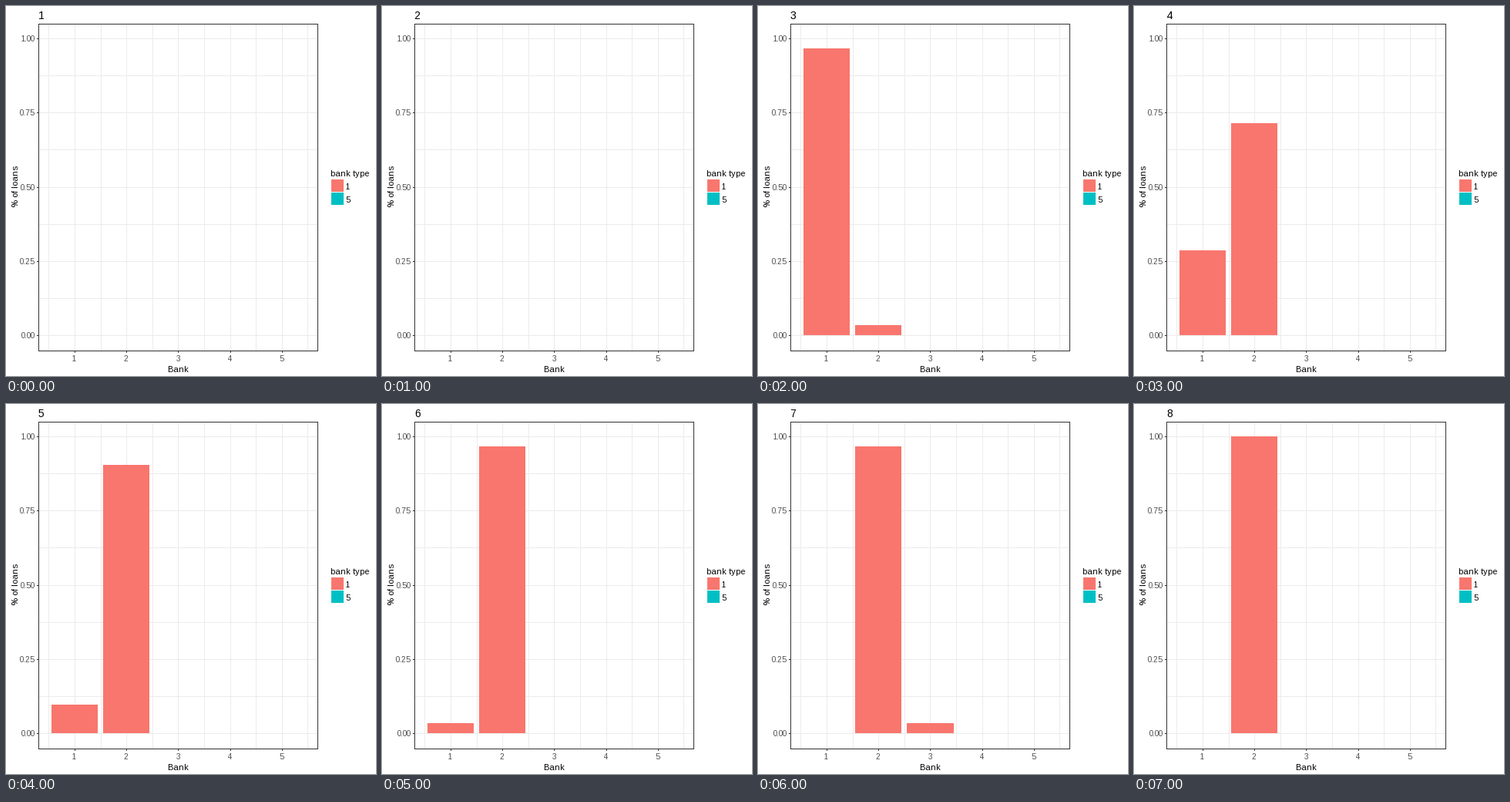
These frames come from a looping animation (480x480 px, 8 s). A matplotlib script:

```python
import math

import matplotlib.pyplot as plt
from matplotlib.animation import FuncAnimation
from matplotlib.patches import Rectangle

plt.rcParams["font.family"] = ["Liberation Sans", "DejaVu Sans"]
plt.rcParams["text.hinting_factor"] = 1  # whole-pixel letter spacing

SALMON, TEAL = "#F8766D", "#00BFC4"
GRID, DARK, LABEL = "#EBEBEB", "#333333", "#4D4D4D"
LEFT, RIGHT, TOP, BOTTOM = 42, 404, 23, 447

# Share of loans held by banks 1 to 3 at each step
SHARES = [
    (0, 0, 0),
    (0, 0, 0),
    (29 / 30, 1 / 30, 0),
    (2 / 7, 5 / 7, 0),
    (3 / 31, 28 / 31, 0),
    (1 / 30, 29 / 30, 0),
    (0, 29 / 30, 1 / 30),
    (0, 1, 0),
]

# At 72 dpi one point equals one pixel
fig = plt.figure(figsize=(480 / 72, 480 / 72), dpi=72, facecolor="white")
ax = fig.add_axes([0, 0, 1, 1])
ax.set_xlim(0, 480)
ax.set_ylim(480, 0)
ax.axis("off")


def bank_x(bank):
    return 42.35 + (bank - 0.305) * 67.16


def share_y(share):
    return 427.3 - 384.6 * share


def box(x, y, w, h, color, z=2):
    rect = Rectangle((x, y), w, h, fc=color, lw=0, antialiased=False, zorder=z)
    return ax.add_patch(rect)


def line(x0, y0, x1, y1, color, z):
    """One-pixel line covering both end pixels."""
    box(x0, y0, x1 - x0 + 1, y1 - y0 + 1, color, z)


def text(x, y, s, size, color="black", ha="left", **kw):
    return ax.text(x, y, s, fontsize=size, color=color, ha=ha,
                   va="baseline", zorder=5, **kw)


# Grid, ticks and tick labels
for i in range(9):
    y = math.floor(share_y(i / 8))
    line(LEFT, y, RIGHT, y, GRID, 1)
    if i % 2 == 0:
        line(LEFT - 2, y, LEFT - 1, y, DARK, 3)
        text(37.5, y + 4, f"{i / 8:.2f}", 9.6, LABEL, "right")

for i in range(1, 12):
    x = round(bank_x(i / 2))
    line(x, TOP, x, BOTTOM, GRID, 1)
    if i % 2 == 0:
        line(x, BOTTOM + 1, x, BOTTOM + 2, DARK, 3)
        text(bank_x(i / 2) - 0.5, 461, str(i // 2), 9.6, LABEL, "center")

# Panel border
for y in (TOP, BOTTOM):
    line(LEFT, y, RIGHT, y, DARK, 4)
for x in (LEFT, RIGHT):
    line(x, TOP, x, BOTTOM, DARK, 4)

# Axis titles and legend
text(223, 475, "Bank", 11, ha="center")
text(16, 261, "% of loans", 11, rotation=90, rotation_mode="anchor")
text(421, 221, "bank type", 11)
for y, name, color in ((225, "1", SALMON), (242, "5", TEAL)):
    box(422, y, 16, 16, color)
    text(440.5, y + 13, name, 9.6)

title = text(42, 17, "", 13.6)
bars = []
for bank in (1, 2, 3):
    x0, x1 = round(bank_x(bank - 0.45)), round(bank_x(bank + 0.45))
    bars.append(box(x0, 427, x1 - x0, 0, SALMON))


def draw(step):
    title.set_text(str(step + 1))
    for bar, share in zip(bars, SHARES[step]):
        top = math.floor(share_y(share))
        bar.set_y(top)
        bar.set_height(427 - top)
        bar.set_visible(share > 0)
    return [title, *bars]


anim = FuncAnimation(fig, draw, frames=8, interval=1000, repeat=True,
                     repeat_delay=0, init_func=lambda: draw(0))
plt.show()
```
